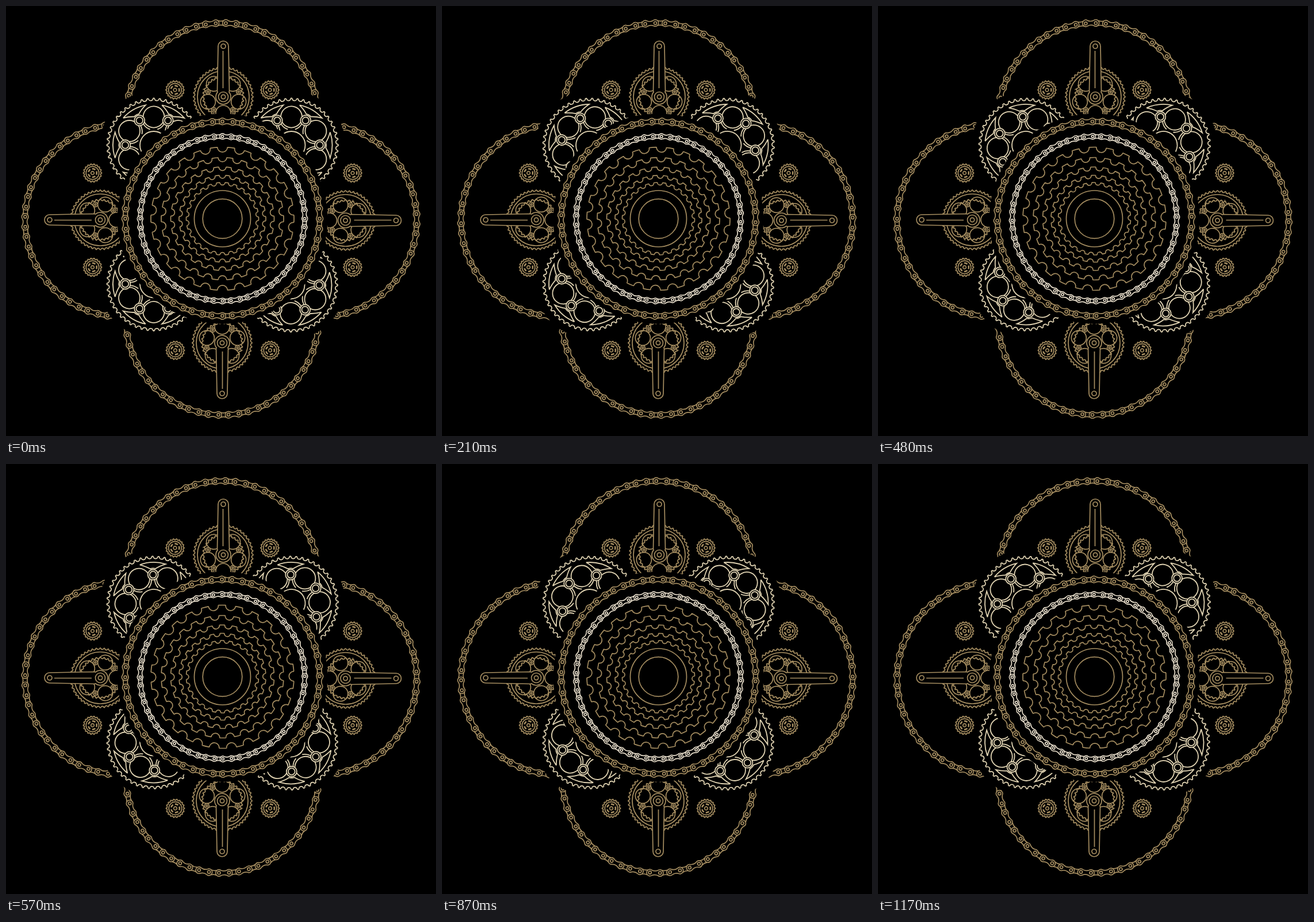
Write an HTML page with a canvas that moves like this. It is 748x748 px and loops after 1200 ms.

```html
<!DOCTYPE html>
<html>
<head>
<meta charset="utf-8">
<style>
html, body { margin: 0; background: #000; overflow: hidden; }
canvas { display: block; }
</style>
</head>
<body>
<canvas id="stage" width="748" height="748"></canvas>
<script>
const ctx = document.getElementById('stage').getContext('2d');
const TAU = Math.PI * 2, DEG = Math.PI / 180;
const GOLD = '#a58d60', CREAM = '#e0d3b2', PALE = '#e9dfcc';
const LOOP = 1200, STEP = 30;
const CENTER = [376.5, 370];
const LINKS = 60, CASSETTE_TEETH = 26;

const CORNERS = [[257, 242], [496.5, 242], [257, 483.5], [495.5, 485.5]];
const OUTER_CHAINS = [[376, 197], [547, 373], [376, 544], [200.5, 373]];
const CRANKS = [[378, 158, 0], [590.5, 373, 90], [376, 586, 180], [164, 372, 270]];
const COGS = [[294, 146], [459, 146], [150.5, 290.5], [603, 290.5],
              [150.5, 454.5], [603, 454.5], [294.5, 599], [459.5, 599]];

function at(x, y, angle, draw) {
  ctx.save();
  ctx.translate(x, y);
  ctx.rotate(angle);
  draw();
  ctx.restore();
}

function repeat(n, draw) {
  for (let i = 0; i < n; i++) at(0, 0, i * TAU / n, () => draw(i));
}

function pen(color, width) {
  ctx.strokeStyle = color;
  ctx.lineWidth = width;
}

function circle(x, y, r) {
  ctx.beginPath();
  ctx.arc(x, y, r, 0, TAU);
  ctx.stroke();
}

function disc(x, y, r) {
  ctx.beginPath();
  ctx.arc(x, y, r, 0, TAU);
  ctx.fill();
}

// Bolt seat: a raised ring that hides what lies under it.
function boss(x, y, outer, inner) {
  disc(x, y, outer);
  circle(x, y, outer);
  circle(x, y, inner);
}

const polar = (r, deg) => [r * Math.cos(deg * DEG), r * Math.sin(deg * DEG)];

// Toothed outline: flat tips separated by round hollows.
function gear(radius, teeth, tip) {
  const half = Math.PI / teeth, tipHalf = half * tip;
  const hollow = radius * Math.sin(half - tipHalf);
  ctx.beginPath();
  for (let i = 0; i < teeth; i++) {
    const a = i * 2 * half, m = a + half;
    ctx.arc(0, 0, radius, a - tipHalf, a + tipHalf);
    ctx.arc(radius * Math.cos(m), radius * Math.sin(m), hollow,
            m - Math.PI / 2, m + Math.PI / 2, true);
  }
  ctx.closePath();
  ctx.stroke();
}

function outerPlate(h, r) {
  const e = 2.2, x = h + r * Math.cos(e), y = r * Math.sin(e);
  ctx.beginPath();
  ctx.arc(h, 0, r, -e, e);
  ctx.quadraticCurveTo(0, r * .35, -x, y);
  ctx.arc(-h, 0, r, Math.PI - e, Math.PI + e);
  ctx.quadraticCurveTo(0, -r * .35, x, -y);
  ctx.stroke();
}

function innerPlate(h, r) {
  const x = h - r * .7;
  ctx.beginPath();
  for (const s of [-1, 1]) {
    ctx.moveTo(-x, s * r * .75);
    ctx.quadraticCurveTo(0, s * r * .45, x, s * r * .75);
  }
  ctx.stroke();
}

function chain([x, y], radius, color, phase, turn) {
  const r = radius * .0343, h = radius * Math.PI / LINKS;
  pen(color, 1.7);
  at(x, y, phase * DEG + turn * 2 * TAU / LINKS, () => repeat(LINKS, i => {
    circle(0, -radius, r * .44);
    at(0, 0, Math.PI / LINKS, () => {
      ctx.translate(0, -radius);
      (i % 2 ? innerPlate : outerPlate)(h, r);
    });
  }));
}

function chainring([x, y], turn) {
  pen(CREAM, 1.8);
  at(x, y, turn * TAU / 6, () => {
    gear(81.5, 48, .25);
    circle(0, 0, 24);
    repeat(6, () => circle(...polar(49, 30), 18.5));
    repeat(6, () => {
      boss(49.5, 0, 9, 5.8);
      ctx.beginPath();
      ctx.arc(0, 0, 71, -18.5 * DEG, 18.5 * DEG);
      ctx.quadraticCurveTo(...polar(65.5, 10.5), ...polar(60, 4.5));
      ctx.quadraticCurveTo(...polar(61.5, 0), ...polar(60, -4.5));
      ctx.quadraticCurveTo(...polar(65.5, -10.5), ...polar(71, -18.5));
      for (const s of [-1, 1]) {
        ctx.moveTo(...polar(41, 4 * s));
        ctx.quadraticCurveTo(...polar(33, 5 * s), ...polar(28, 17 * s));
      }
      ctx.stroke();
    });
  });
}

function crank([x, y, deg]) {
  pen(GOLD, 1.7);
  at(x, y, deg * DEG, () => {
    gear(52, 46, .3);
    circle(0, 0, 45);
    gear(36, 32, .3);
    repeat(5, () => at(0, 0, Math.PI / 5, () => circle(0, -28, 13)));
    repeat(5, () => boss(0, -28, 4, 1.5));
    ctx.beginPath();
    ctx.arc(0, -88, 9, Math.PI, 0);
    ctx.lineTo(10.5, -10);
    ctx.arc(0, 0, 13, -.7, Math.PI + .7);
    ctx.lineTo(-10.5, -10);
    ctx.closePath();
    ctx.fill();
    ctx.stroke();
    circle(0, -88, 4);
    circle(0, 0, 8.5);
    circle(0, 0, 3.6);
    ctx.beginPath();
    ctx.moveTo(-.5, -80);
    ctx.lineTo(-.5, -15);
    ctx.stroke();
  });
}

function cog([x, y]) {
  pen(GOLD, 1.7);
  at(x, y, 0, () => {
    gear(16, 18, .35);
    circle(0, 0, 11.3);
    circle(0, 0, 2.8);
    ctx.lineWidth = 2.6;
    repeat(5, () => {
      ctx.beginPath();
      ctx.arc(0, 0, 7.4, -.4, .4);
      ctx.stroke();
    });
  });
}

function cassette(turn) {
  pen(GOLD, 1.7);
  at(...CENTER, (turn - .5) * TAU / CASSETTE_TEETH - Math.PI / 2, () => {
    for (const r of [124.5, 106.5, 90, 75.5, 63]) gear(r, CASSETTE_TEETH, .42);
  });
  circle(...CENTER, 49);
  circle(...CENTER, 34.3);
}

function render(now) {
  const turn = Math.floor(now % LOOP / STEP) * STEP / LOOP;
  ctx.fillStyle = '#000';
  ctx.fillRect(0, 0, 748, 748);
  for (const c of OUTER_CHAINS) chain(c, 167.3, GOLD, 2.2, turn);
  for (const c of CORNERS) disc(...c, 94);
  for (const c of CORNERS) chainring(c, turn);
  CRANKS.forEach(crank);
  COGS.forEach(cog);
  disc(...CENTER, 183);
  chain(CENTER, 169, GOLD, 0, turn);
  chain(CENTER, 143, PALE, 0, turn);
  cassette(turn);
}

const start = performance.now();
function tick() {
  render(performance.now() - start);
  requestAnimationFrame(tick);
}
tick();
</script>
</body>
</html>
```
